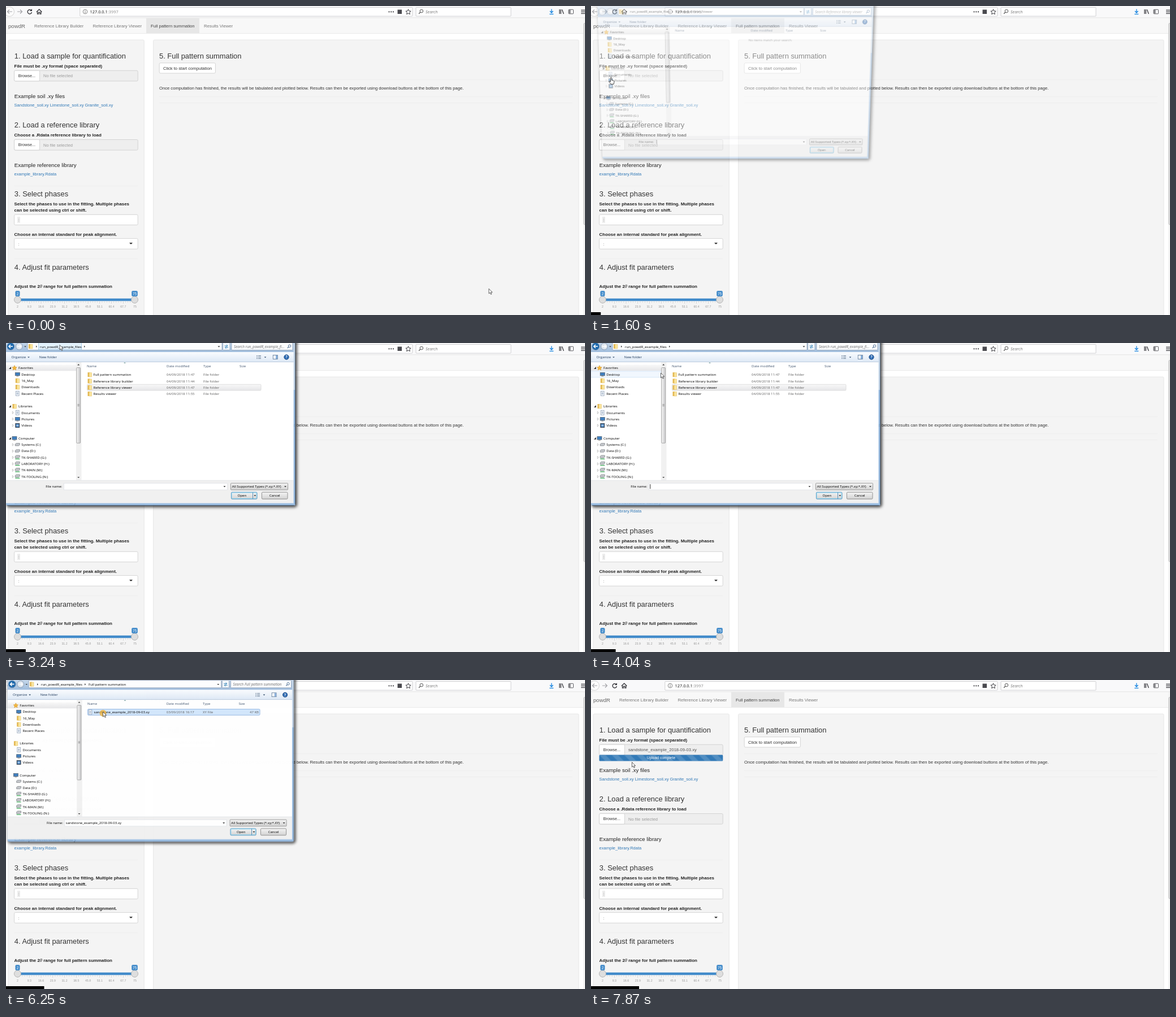
An HTML page that plays this animation: 1024 px wide and 547 px high, repeating every 8 s.

```html
<!DOCTYPE html>
<html lang="en">
<head>
<meta charset="utf-8">
<title>Full pattern summation</title>
<style>
html, body { margin: 0; width: 100%; height: 100%; overflow: hidden; background: #fff; }
#stage { position: relative; width: 1024px; height: 547px; overflow: hidden; }
svg { position: absolute; left: 0; top: 0; display: block; }
text { white-space: pre; }
#page { font-family: "Liberation Sans", Arial, sans-serif; }
#dialog, .ui { font-family: "Open Sans", "Noto Sans", sans-serif; }
#dialog { top: -8px; border-radius: 0 0 4px 4px; transform-origin: 255px 153px; font-weight: 500;
  box-shadow: 2px 2px 5px 1px rgba(0,0,0,.68); }
</style>
</head>
<body>
<div id="stage">
  <svg id="page" width="1024" height="547"></svg>
  <svg id="dialog" width="512" height="296" viewBox="0 -8 512 296"></svg>
  <svg id="top" width="1024" height="547"></svg>
</div>
<script>
const $ = id => document.getElementById(id);
const text = (x, y, size, str, fill = '#333', more = '') =>
  `<text x="${x}" y="${y + size * 0.36}" font-size="${size}" fill="${fill}" ${more}>${str}</text>`;
const rect = (x, y, w, h, fill, more = '') =>
  `<rect x="${x}" y="${y}" width="${w}" height="${h}" fill="${fill}" ${more}/>`;
const box = (x, y, w, h, fill, edge, r = 0, more = '') =>
  rect(x, y, w, h, fill, `stroke="${edge}" stroke-width=".8" rx="${r}" ${more}`);
const path = (d, fill = 'none', edge = 'none', w = 1) =>
  `<path d="${d}" fill="${fill}" stroke="${edge}" stroke-width="${w}"/>`;
const circle = (x, y, r, fill, edge = 'none', w = 1) =>
  `<circle cx="${x}" cy="${y}" r="${r}" fill="${fill}" stroke="${edge}" stroke-width="${w}"/>`;
const group = (id, body, more = '') => `<g id="${id}" ${more}>${body}</g>`;
const down = (x, y, s = 2, fill = '#222') => path(`M${x - s} ${y - s / 2}h${2 * s}l${-s} ${s}z`, fill);
const right = (x, y, s = 2, fill = '#222') => path(`M${x - s / 2} ${y - s}v${2 * s}l${s} ${-s}z`, fill);
const lens = (x, y, r, c) => circle(x, y, r, 'none', c, 1) +
  path(`M${x - r * 0.7} ${y + r * 0.7}l${-r} ${r}`, 'none', c, 1.2);
const gradient = (id, a, b) => `<linearGradient id="${id}" x2="0" y2="1">
  <stop stop-color="${a}"/><stop offset="1" stop-color="${b}"/></linearGradient>`;

const BODY = 7.64, BOLD = 'font-weight="bold"', LINK = '#337ab7', FILE = 'sandstone_example_2018-09-03.xy';

function toolbar() {
  const ink = '#38383d';
  return rect(0, 0, 1024, 21, '#f9f9fa') +
    circle(6, 10, 8.5, '#fcfcfc', '#c8c8c8', .8) +
    path('M11 10H2.5M6 6.5L2.5 10L6 13.5M20 10h8.5M25 6.5L28.5 10L25 13.5', 'none', '#a4a4a8', 1.2) +
    path('M44.7 7.8A3.7 3.7 0 1 0 45.5 11', 'none', ink, 1.4) + path('M46 5v4h-4z', ink) +
    path('M54 10.5L58.7 6L63.4 10.5M55.5 10v4.2h2v-3h2.4v3h2V10', 'none', ink, 1.3) +
    box(130.8, 2.5, 588, 15.6, '#fff', '#c6c6c8', 1) +
    circle(140, 10, 3.8, 'none', '#666', .8) + path('M140 9.5v2.8M140 7.5v1', 'none', '#666', 1) +
    `<g class="ui">${text(148.5, 10.3, 7.4, '127.0.0.1<tspan fill="#8c8c8c">:3997</tspan>', '#111')}</g>` +
    [677.5, 681.2, 684.9].map(x => circle(x, 10.3, 1.1, ink)).join('') +
    rect(692.5, 6.5, 7.5, 7.5, '#4a4a4f') +
    path('M711.5 5.8l1.4 3 3.2.4-2.4 2.2.7 3.2-2.9-1.6-2.9 1.6.7-3.2-2.4-2.2 3.2-.4z', 'none', ink, 1) +
    box(725, 2.5, 168, 15.6, '#fff', '#c6c6c8', 1) +
    lens(734.8, 9, 2.8, '#555') +
    `<g class="ui">${text(742, 10.5, 7.2, 'Search', '#757575', 'font-style="italic"')}</g>` +
    path('M964.8 5.5v6M962 9l2.8 3 2.8-3M961.3 14.3h7', 'none', '#1583e0', 1.3) +
    path('M979 6v8M981.3 6v8M983.4 6.3l2.8 7.7', 'none', ink, 1.3) +
    box(995, 6.3, 8.5, 7.5, 'none', ink, 1) + rect(995.5, 7, 3, 6, ink, 'opacity=".6"') +
    path('M1017 7.3h7M1017 10.3h7M1017 13.3h7', 'none', ink, 1.2) +
    rect(0, 20.6, 1024, .8, '#cfcfcf');
}

function navbar() {
  return rect(0, 21.4, 1021, 27, '#f8f8f8') + rect(0, 48, 1021, .7, '#e2e2e2') +
    rect(248, 21.5, 94, 26.7, '#e7e7e7') +
    text(4, 35.3, 9.64, 'powdR', '#666') +
    text(50, 35, 7.7, 'Reference Library Builder', '#777') +
    text(153.5, 35, 7.7, 'Reference Library Viewer', '#777') +
    text(256, 35, 7.64, 'Full pattern summation', '#444') +
    text(350, 35, 7.7, 'Results Viewer', '#777');
}

function fileInput(y, id) {
  return box(14.6, y, 218.6, 18.6, '#eee', '#ccc', 2) +
    box(14.6, y, 45, 18.6, '#fff', '#ccc', 2, `id="${id}Button"`) +
    text(21.7, y + 9.3, 7.3, 'Browse...') +
    text(66, y + 9.3, 7.6, 'No file selected', '#999', `id="${id}Name"`);
}

function slider() {
  let s = '';
  for (let i = 0; i <= 50; i++) {
    s += rect(20.3 + i * 4.15, 523, .5, i % 5 ? 2 : 4, '#bbb');
    if (i % 5 == 0) s += text(20.5 + i * 4.15, 532, 5.2, +(2 + 1.46 * i).toFixed(1), '#999', 'text-anchor="middle"');
  }
  s += rect(17, 517.8, 214, 4.4, '#428bca', 'rx="2"');
  for (const [x, w, v] of [[20.5, 8, 2], [227.5, 10.6, 75]])
    s += circle(x, 520, 6, '#dedede', '#aaa', .8) + rect(x - w / 2, 504.2, w, 9.8, '#428bca', 'rx="2"') +
      text(x, 509.2, 6.4, v, '#fff', 'text-anchor="middle"');
  return s;
}

function buildPage() {
  const h = (x, y, s) => text(x, y, 12.9, s);
  const sub = (y, s) => text(14.8, y, 9.65, s, '#222');
  const bold = (y, s) => text(14.6, y, 7.92, s, '#222', BOLD);
  const rule = (x, y, w) => rect(x, y, w, .7, '#ececec');
  $('page').innerHTML = `<defs><pattern id="stripes" x="14.5" y="132.6" width="22" height="11" patternUnits="userSpaceOnUse">
      ${rect(0, 0, 22, 11, '#337ab7')}${path('M0 0H11L22 11H11Z', 'rgba(255,255,255,.15)')}</pattern></defs>` +
    rect(0, 0, 1024, 547, '#fff') + toolbar() + navbar() +
    rect(1021, 21.4, 3, 526, '#f4f4f4') + box(1022, 30.5, 6, 356.5, '#e6e6e6', '#a6a6a8', 1.5) +
    box(4, 60, 240.3, 500, '#f4f4f4', '#e3e3e3', 2) +
    box(260.6, 60, 752.4, 500, '#f4f4f4', '#e3e3e3', 2) +
    h(14.8, 88.3, '1. Load a sample for quantification') +
    bold(106, 'File must be .xy format (space separated)') + fileInput(114.3, 'sample') +
    group('upload', rect(14.5, 132.6, 218.8, 10.8, 'url(#stripes)', 'rx="1.5"') +
      text(124, 138, 6.73, 'Upload complete', '#fff', 'text-anchor="middle"')) +
    sub(160, 'Example soil .xy files') +
    text(14.6, 175.7, 7.53, 'Sandstone_soil.xy Limestone_soil.xy Granite_soil.xy', LINK) +
    h(14.8, 210.3, '2. Load a reference library') +
    bold(228.6, 'Choose a .Rdata reference library to load') + fileInput(236.5, 'library') +
    sub(282, 'Example reference library') +
    text(14.6, 297.6, 7.52, 'example_library.Rdata', LINK) +
    rule(14.6, 318, 219) +
    h(14.8, 332.6, '3. Select phases') +
    bold(350.5, 'Select the phases to use in the fitting. Multiple phases') +
    bold(361.2, 'can be selected using ctrl or shift.') +
    box(14.6, 369.3, 218.6, 18.3, '#fff', '#ccc', 2) + rect(20, 373, 5, 11, '#ececec') +
    text(21.6, 378.5, BODY, ':', '#777') +
    bold(404, 'Choose an internal standard for peak alignment.') +
    box(14.6, 411.6, 218.6, 18.6, '#fff', '#ccc', 2) + text(21.4, 421, BODY, ':', '#777') + down(221, 420.5, 3, '#333') +
    rule(14.6, 447, 219) +
    h(14.8, 462.2, '4. Adjust fit parameters') +
    bold(496.6, 'Adjust the 2<tspan font-family="Liberation Serif, serif" font-style="italic" font-weight="normal" font-size="8.6">θ</tspan> range for full pattern summation') +
    slider() +
    h(271, 88.3, '5. Full pattern summation') +
    box(271.2, 100.8, 99.2, 18.2, '#fff', '#ccc', 2) + text(278, 110, 7.66, 'Click to start computation') +
    rule(271, 130, 731) + rule(271, 160, 731) + rule(271, 171, 731) +
    text(271, 145.7, BODY, 'Once computation has finished, the results will be tabulated and plotted below. Results can then be exported using download buttons at the bottom of this page.');
}

// Dialog rows sit on a common pitch
const PITCH = 11.33, SMALL = 6.12;
const sideY = k => 44 + PITCH * k, listY = k => 56 + PITCH * k;
const label = (x, y, s, fill = '#000', more) => text(x, y, SMALL, s, fill, more);
const folder = (x, y) => path(`M${x - 3.5} ${y - 4}h4v8h-4z`, '#e3b852') + path(`M${x - 1} ${y - 3.5}h4.5v7.5h-4.5z`, '#fae59c', '#e2bd62', .5);
const sheet = (x, y) => box(x - 2.8, y - 4, 5.6, 8, '#fff', '#8a9db5') + path(`M${x - 1.5} ${y - 1.5}h3M${x - 1.5} ${y}h3M${x - 1.5} ${y + 1.5}h3`, 'none', '#58799f', .6);
const screen = (x, y) => box(x - 4, y - 3, 8, 5.4, '#3f7fc0', '#54626f') + rect(x - 2, y + 3, 4, .9, '#777');
const film = (x, y) => box(x - 3.5, y - 3.5, 7, 7, '#3a6fa8', '#333') + rect(x - 2, y - 1.5, 4, 3, '#9cc4ea');
const disk = (x, y) => path(`M${x - 4} ${y - 1}l2-1.5h6v3l-2 1.5h-6z`, '#c3c6ca', '#6a6e74', .6);
const share = (x, y) => disk(x, y - 1.2) + rect(x - 4, y + 2, 8, 1.3, '#3fae5b');

const SIDE = [
  [0, 'Favorites', (x, y) => path(`M${x} ${y - 4.3}l1.3 2.8 3 .4-2.2 2.1.6 3-2.7-1.5-2.7 1.5.6-3-2.2-2.1 3-.4z`, '#f3b63a', '#cf8d1c', .5)],
  [1, 'Desktop', screen], [2, '16_May', folder], [3, 'Downloads', folder], [4, 'Recent Places', sheet],
  [6, 'Libraries', folder], [7, 'Documents', sheet], [8, 'Pictures', screen], [9, 'Videos', film],
  [11, 'Computer', screen], [12, 'Systems (C:)', disk], [13, 'Data (D:)', disk],
  [14, 'TK-SHARED (G:)', share], [15, 'LABORATORY (H:)', share], [16, 'TK-MAIN (M:)', share], [17, 'TK-TOOLING (N:)', share]
];
const HEADS = [0, 6, 11];

function sidebar() {
  let items = '', arrows = '';
  for (const [k, name, icon] of SIDE) {
    const y = sideY(k), head = HEADS.includes(k);
    items += icon(head ? 15 : 20.3, y) + label(head ? 22 : 27.3, y, name);
    if (head) arrows += path(`M9 ${y - 2}v4h-4z`, '#333');
    else if (k > 6) arrows += path(`M11.3 ${y - 2.2}v4.4l2.4-2.2z`, '#fff', '#a5a5a5', .6);
  }
  return rect(0, 34, 508.5, 209, '#fff') +
    rect(0, 38.5, 124, 10.8, 'url(#soft)') + box(-2, 0, 126, 10.8, '#f1f7fe', '#cfe2f6', 1, 'id="sideHover"') +
    items + group('arrows', arrows) +
    rect(124, 34, 9.5, 209, '#f1f1f1') + box(124.6, 43.6, 7, 133.6, 'url(#thumb)', '#9a9a9a', 1) +
    path('M126.4 108.5h3.4M126.4 110h3.4M126.4 111.5h3.4', 'none', '#777', .6) +
    path('M126.2 39.5h4l-2-2.4z', '#444') + down(128.2, 238, 2, '#444');
}

const row = (k, icon, name, date, kind, size) => icon(148, listY(k)) + label(154.5, listY(k), name) +
  label(284, listY(k), date, '#5f5f5f') + label(349, listY(k), kind, '#5f5f5f') +
  label(449, listY(k), size, '#5f5f5f', 'text-anchor="end"');

function lists() {
  const folders = [['Full pattern summation', 47], ['Reference library builder', 44], ['Reference library viewer', 47], ['Results viewer', 55]];
  return [['Name', 143], ['Date modified', 284], ['Type', 349], ['Size', 413]].map(([s, x]) => label(x, 40.5, s, '#41556f')).join('') +
    path('M208 36h4l-2-2z', '#8aa') +
    group('view0', label(280, 59.3, 'No items match your search.', '#5f5f5f')) +
    box(143.4, listY(2) - 5.4, 307.6, 10.8, 'url(#soft)', '#d9d9d9', 1.5, 'id="oldRow"') +
    box(143.4, listY(0) - 5.4, 307.6, 10.8, '#f3f9ff', '#c4dcf5', 1.5, 'id="rowMark"') +
    group('view1', folders.map(([n, m], k) => row(k, folder, n, `04/09/2018 11:${m}`, 'File folder', '')).join('')) +
    group('view2', row(0, sheet, FILE, '03/09/2018 16:17', 'XY File', '47 KB'));
}

function addressBar() {
  return box(38, -1, 344, 13.5, '#fcfdfe', '#8c9db3', 1) + box(383.5, -1, 12.5, 13.5, '#f3f7fc', '#8c9db3', 1) +
    box(399, -1, 108, 13.5, '#fcfdfe', '#8c9db3', 1) +
    group('nav', circle(8.3, 6, 6.5, '#dfe7f0', '#7f93ab', .9)) + circle(23.4, 6, 6, '#dfe7f0', '#8396ad', .9) +
    path('M12 6H5M8 3L5 6l3 3', 'none', '#fff', 1.6) + path('M20 6h6.5M24 3.4L26.6 6 24 8.6', 'none', '#fff', 1.4) +
    down(34, 6.5, 1.8, '#333') + folder(43.5, 6) + right(54, 6.3, 1.8) +
    box(57.5, -.5, 76, 12.5, '#e3f2fd', '#9ec5e6', 0, 'id="crumbHover"') +
    label(60, 6.3, 'run_powdR_example_files') + right(139, 6.3, 1.8) + label(145, 6.3, '', '#000', 'id="crumb"') +
    down(376.5, 6.5, 2) + path('M386.5 5h5.5M390 3l2 2-2 2M393 8h-5.5M389.5 6l-2 2 2 2', 'none', '#2f80b5', .9) +
    text(403, 6.4, 6.4, '', '#6c6c6c', 'id="find" font-style="italic" font-weight="400"') + lens(501.5, 5.3, 2.2, '#4f6f94');
}

function buildDialog() {
  const middle = 'text-anchor="middle"';
  $('dialog').innerHTML = '<defs>' + gradient('glass', '#d3e1f0', '#9fbcdc') +
    gradient('bar', '#fafcff', '#dde8f5') + gradient('soft', '#f8f8f8', '#e6e6e8') + gradient('button', '#f4f4f4', '#d2d2d2') +
    `<linearGradient id="thumb"><stop stop-color="#f5f5f5"/><stop offset="1" stop-color="#c9c9cb"/></linearGradient></defs>` +
    rect(0, -8, 512, 91, '#c6d7e9') + rect(0, 83, 512, 205, '#8fb5de', 'opacity=".88"') +
    rect(0, -8, 508.5, 24.5, 'url(#glass)') +
    rect(511.2, -8, .8, 296, '#34465a') + rect(0, 287.2, 512, .8, '#34465a') + rect(0, 283.2, 509, .6, '#d5e6f6') +
    addressBar() +
    rect(0, 16, 508.5, 17.6, 'url(#bar)') + rect(0, 33.2, 508.5, .7, '#b5c5d8') +
    label(9.6, 25, 'Organize', '#1e395b') + down(40, 25.3, 1.8, '#1e395b') + label(58.8, 25, 'New folder', '#1e395b') +
    path('M443 22.5h2M446 22.5h5M443 25h2M446 25h5M443 27.5h2M446 27.5h5', 'none', '#6b7f96', 1) + down(458.5, 25.3, 1.8, '#1e395b') +
    box(472.3, 21.5, 8, 7, '#fff', '#54708f') + rect(477, 22, 3, 6, '#86aedb') +
    circle(496, 25, 4.2, '#2c6bb5', '#1c4577', .8) + text(496, 25, 6.5, '?', '#fff', `${middle} ${BOLD}`) +
    sidebar() + lists() +
    rect(0, 243, 508.5, 40.2, '#f0f0f0') + rect(0, 242.8, 508.5, .6, '#dcdfe4') +
    label(99.3, 254, 'File name:', '#000', 'text-anchor="end"') +
    box(102.3, 248.2, 289, 11.8, '#fff', '#dfe2e7') + down(386.5, 254.3, 2) +
    label(104.3, 254, FILE, '#000', 'id="fileName"') + rect(104.4, 250, .8, 8.2, '#000', 'id="caret"') +
    box(397.5, 248.2, 101, 11.8, 'url(#button)', '#8a8a8a', 1) + label(399.8, 254, 'All Supported Types (*.xy;*.XY)') + down(494, 254.3, 2) +
    box(398.4, 264.2, 45.6, 12, 'url(#button)', '#3c7fb1', 1.5) +
    rect(399.2, 265, 44, 10.4, 'none', 'stroke="#6fd0f5" stroke-width=".8" rx="1"') +
    group('openOne', label(421, 270, 'Open', '#000', middle)) +
    group('openSplit', label(417.3, 270, 'Open', '#000', middle) + rect(436, 264.5, .8, 11.4, '#3c7fb1') + down(440.3, 270.3, 2)) +
    box(452.4, 264.2, 45.6, 12, 'url(#button)', '#7d7d7d', 1.5) + label(475.2, 270, 'Cancel', '#000', middle);
}

function buildTop() {
  $('top').innerHTML = rect(0, 542, 0, 5, '#000', 'id="strip"') +
    group('pointer', group('click', circle(0, 2.5, 6, '#efb034'), 'opacity=".75"') +
      group('arrow', path('M0 0V8.6L2 6.8L3.5 10L4.9 9.4L3.5 6.3H6.2Z', '#fff', '#222', .7)) +
      group('hand', path('M-1 1a1 1 0 0 1 2 0V4.8l3 .6q1.7.4 1.5 2.2l-.8 4.2h-5l-3.4-4.3q.2-1.3 1.4-.8l1.3 1.1z', '#fff', '#222', .8)));
}

const LOOP = 8000;
const STEPS = [0, 200, 400, 600, 800, 1000, 1200, 1400, 1600, 1820, 2020, 2200, 2400, 2620, 2820, 3020, 3230, 3440, 3650,
  3840, 4040, 4260, 4450, 4650, 4850, 5050, 5250, 5450, 5670, 5850, 6050, 6250, 6490, 6690, 6890, 7090, 7310, 7500, 7690, 7870];
const MOVES = [[100, 854, 500.5], [1000, 35.5, 126.5], [1600, 35.5, 126.5], [2020, 41.5, 125.5], [2620, 95, 3.5], [3650, 95, 3.5],
  [4040, 123.5, 53], [4450, 171.5, 56.3], [7090, 171.5, 56.3], [7870, 72.5, 145.5]];
const CLICKS = [1200, 2820, 4650, 4850, 5850, 6050, 6250];
const ease = p => p * p * (3 - 2 * p);

function pointerAt(t) {
  const i = MOVES.findIndex(m => m[0] >= t);
  if (i < 0) return MOVES[MOVES.length - 1].slice(1);
  if (i == 0) return MOVES[0].slice(1);
  const [a, ax, ay] = MOVES[i - 1], [b, bx, by] = MOVES[i], p = ease((t - a) / (b - a));
  return [ax + (bx - ax) * p, ay + (by - ay) * p];
}

const show = (id, on) => $(id).style.display = on ? '' : 'none';
const set = (id, name, v) => $(id).setAttribute(name, v);

function draw(t) {
  const uploaded = t >= 6490, picked = t >= 5850;
  const view = t < 3020 ? 0 : t < 5050 ? 1 : 2;

  $('sampleName').textContent = uploaded ? FILE : 'No file selected';
  set('sampleName', 'fill', uploaded ? '#555' : '#999');
  set('sampleButton', 'fill', t >= 1000 && t < 1600 ? '#e6e6e6' : '#fff');
  show('upload', t >= 6690);

  const d = $('dialog').style;
  show('dialog', t >= 1600 && !uploaded);
  d.opacity = t < 1820 ? .44 : t < 6250 ? 1 : .99;
  d.transform = t < 1820 ? 'translateY(-4px) perspective(1107px) rotateX(-8.9deg) scale(.937)' : t < 6250 ? 'none' : 'scale(.99)';
  for (let i = 0; i < 3; i++) show('view' + i, i == view);
  $('crumb').textContent = ['Reference library viewer', '', 'Full pattern summation'][view];
  $('find').textContent = 'Search ' + ['Reference library viewer', 'run_powdR_example_fi...', 'Full pattern summation'][view];
  $('nav').firstChild.setAttribute('fill', view ? '#1d69ad' : '#dfe7f0');
  show('crumbHover', t >= 2620 && t < 3840);
  show('arrows', t < 5050);
  show('oldRow', view == 1 && t < 4650);

  const side = t >= 1820 && t < 2200 ? 7 : t == 4040 ? 1 : -1;
  show('sideHover', side >= 0);
  set('sideHover', 'y', sideY(side) - 5.4);
  const chosen = picked || t == 4650 || t == 4850;
  show('rowMark', t >= 4260);
  set('rowMark', 'fill', chosen ? '#d2e6fb' : '#f3f9ff');
  set('rowMark', 'stroke', chosen ? '#84acdd' : '#c4dcf5');
  show('openOne', !view);
  show('openSplit', view);
  show('fileName', picked);
  show('caret', !picked && (t - 1400) % 1060 < 530);

  const hand = t >= 1000 && t < 2200, [x, y] = pointerAt(t);
  set('pointer', 'transform', `translate(${x} ${y})`);
  show('click', CLICKS.includes(t));
  show('arrow', !hand);
  show('hand', hand);
  set('strip', 'width', t * .0108);
}

buildPage();
buildDialog();
buildTop();
let shown = -1;
function tick() {
  const now = performance.now() % LOOP;
  let t = 0;
  for (const s of STEPS) if (s <= now) t = s;
  if (t != shown) draw(shown = t);
  requestAnimationFrame(tick);
}
tick();
</script>
</body>
</html>
```
